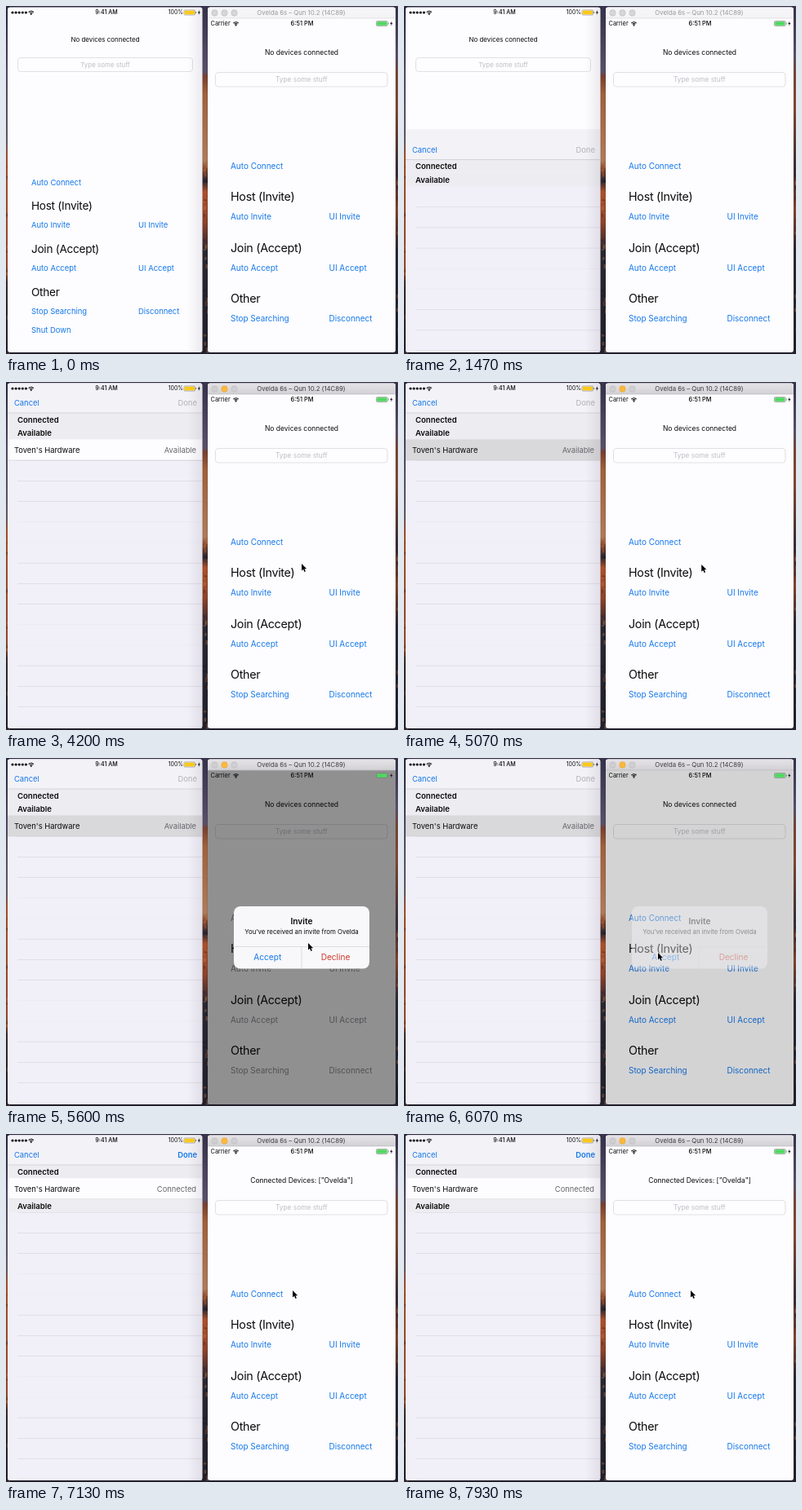
These frames come from a looping animation (480x427 px, 8 s). An HTML page with a canvas:

```html
<!DOCTYPE html>
<html lang="en">
<head>
<meta charset="utf-8">
<title>Device pairing</title>
<style>
  html, body { margin: 0; width: 100%; height: 100%; overflow: hidden; background: #23212e; }
  canvas { display: block; width: 480px; height: 427px; }
</style>
</head>
<body>
<canvas id="stage"></canvas>
<script>
const W = 480, H = 427, LOOP = 8000;
const BLUE = '#1478ea', INK = '#0b0b0c';
const PEER = "Toven's Hardware", PHONE = 'Ovelda';
const canvas = document.getElementById('stage');
const ctx = canvas.getContext('2d');
const dpr = window.devicePixelRatio || 1;
canvas.width = W * dpr;
canvas.height = H * dpr;

const clamp = v => Math.max(0, Math.min(1, v));
const span = (t, start, length) => clamp((t - start) / length);
const easeOut = p => 1 - (1 - p) ** 3;
const smooth = p => p * p * (3 - 2 * p);

function rect(x, y, w, h, color) {
  ctx.fillStyle = color;
  ctx.fillRect(x, y, w, h);
}

function roundPath(x, y, w, h, r) {
  ctx.beginPath();
  ctx.roundRect(x, y, w, h, r);
}

function dot(x, y, r, color) {
  ctx.fillStyle = color;
  ctx.beginPath();
  ctx.arc(x, y, r, 0, Math.PI * 2);
  ctx.fill();
}

function vertical(y0, y1, marks) {
  const g = ctx.createLinearGradient(0, y0, 0, y1);
  marks.forEach(([y, color]) => g.addColorStop((y - y0) / (y1 - y0), color));
  return g;
}

// y is about the middle of the capital letters
function text(str, x, y, size, { color = INK, align = 'left', weight = 400, track = 0 } = {}) {
  ctx.font = `${weight} ${size}px Inter, "Liberation Sans", sans-serif`;
  ctx.letterSpacing = `${track * size}px`;
  ctx.textAlign = align;
  ctx.textBaseline = 'alphabetic';
  ctx.fillStyle = color;
  ctx.fillText(str, x, y + size * 0.34);
}

function withAlpha(alpha, draw) {
  ctx.save();
  ctx.globalAlpha *= alpha;
  draw();
  ctx.restore();
}

// Desktop showing in the strips beside the two windows
function makeDesktop() {
  const strips = [
    [0, vertical(0, H, [[0, '#2a2a42'], [80, '#54506a'], [165, '#6b6070'], [185, '#b4562e'],
      [320, '#a54a2c'], [345, '#3a2b32'], [H, '#23222e']])],
    [240, vertical(0, H, [[0, '#38344e'], [80, '#5d5470'], [87, '#7e4432'], [108, '#a9663f'],
      [190, '#b98260'], [200, '#8d4a2f'], [215, '#2b2832'], [228, '#b5552f'],
      [265, '#96472e'], [300, '#2c2934'], [H, '#22222e']])],
    [476, vertical(0, H, [[0, '#38344e'], [60, '#5d5470'], [85, '#7e4a38'], [125, '#8a4c34'],
      [200, '#3c3038'], [250, '#8a4830'], [300, '#2c2934'], [H, '#22222e']])]
  ];
  let seed = 7;
  const rnd = () => (seed = (seed * 16807) % 2147483647) / 2147483647;
  const specks = Array.from({ length: 110 }, () => {
    const x = [0, 241, 478][Math.floor(rnd() * 3)] + rnd() * 5;
    const y = 190 + rnd() * 237;
    return [x, y, 1 + rnd() * 3, 1 + rnd() * 5, rnd() < 0.55 ? '#1a1a2666' : '#d9825055'];
  });
  return () => {
    rect(0, 0, W, 200, '#34314a');
    rect(0, 200, W, 227, '#23222e');
    strips.forEach(([x, fill]) => rect(x, 0, 9, H, fill));
    specks.forEach(s => rect(...s));
  };
}
const drawDesktop = makeDesktop();

function windowShadow(x, y, w, h) {
  ctx.save();
  ctx.shadowColor = 'rgba(0,0,0,.3)';
  ctx.shadowBlur = 4 * dpr;
  ctx.fillStyle = '#fdfcfe';
  roundPath(x, y, w, h, 3);
  ctx.fill();
  ctx.restore();
}

function wifi(x, y) {
  ctx.strokeStyle = INK;
  ctx.lineWidth = 1.1;
  [2.3, 4.2].forEach(r => {
    ctx.beginPath();
    ctx.arc(x, y, r, -Math.PI * 0.77, -Math.PI * 0.23);
    ctx.stroke();
  });
  dot(x, y - 0.3, 0.9, INK);
}

function battery(x, y, color) {
  ctx.strokeStyle = '#77777a';
  ctx.lineWidth = 0.6;
  roundPath(x, y - 3, 13.6, 6, 1.2);
  ctx.stroke();
  rect(x + 0.7, y - 2.3, 12.2, 4.6, color);
  rect(x + 14.2, y - 1, 0.9, 2, '#77777a');
  ctx.fillStyle = INK;
  ctx.beginPath();
  [[18.9, -3], [16.8, 0.5], [18.3, 0.5], [17.6, 3], [20, -0.6], [18.5, -0.6]]
    .forEach(([dx, dy]) => ctx.lineTo(x + dx, y + dy));
  ctx.fill();
}

function field(x, y, w, h, size) {
  ctx.strokeStyle = '#dddce0';
  ctx.lineWidth = 0.9;
  roundPath(x, y, w, h, 3.5);
  ctx.stroke();
  text('Type some stuff', x + w / 2, y + h / 2, size, { color: '#bfbfc5', align: 'center' });
}

// Shared page of headings and link buttons
function menu(cols, rows, linkSize, headSize, color, faded = {}) {
  const link = (str, x, y) =>
    withAlpha(faded[str] ?? 1, () => text(str, x, y, linkSize, { color }));
  const head = (str, y) => text(str, cols[0], y, headSize, { track: -0.02 });
  const [a, b] = cols;
  link('Auto Connect', a, rows[0]);
  head('Host (Invite)', rows[1]);
  link('Auto Invite', a, rows[2]);
  link('UI Invite', b, rows[2]);
  head('Join (Accept)', rows[3]);
  link('Auto Accept', a, rows[4]);
  link('UI Accept', b, rows[4]);
  head('Other', rows[5]);
  link('Stop Searching', a, rows[6]);
  link('Disconnect', b, rows[6]);
  if (rows[7]) link('Shut Down', a, rows[7]);
}

// Opacity of a button pressed at one time and released at another
function press(t, down, up) {
  return t < down ? 1 : t < up ? 0.3 : 0.3 + 0.7 * span(t, up, 230);
}

function header(str, y) {
  rect(2, y, 238, 16.2, '#ededf1');
  text(str, 14, y + 8.7, 9.55, { weight: 600 });
}

function peerRow(y, state, selected) {
  rect(2, y, 238, 25.5, selected ? '#d9d8da' : '#fdfcfe');
  rect(2, y + 25.3, 238, 0.7, '#d2d1d6');
  text(PEER, 10, y + 13.2, 9.4);
  text(state, 233, y + 13.2, 9.3, { color: '#68686c', align: 'right' });
}

function browser(t, top) {
  const joined = t >= 7130, found = t >= 3070;
  ctx.save();
  ctx.translate(0, top);
  rect(2, 1, 238, 426, '#f1eff7');
  rect(2, 1, 238, 37, '#f3f2f6');
  text('Cancel', 10, 26.2, 9.4, { color: BLUE });
  text('Done', 234, 26.2, 9.4, { color: joined ? BLUE : '#bcbbc1', align: 'right', weight: joined ? 600 : 500 });
  for (let i = 1; i < 15; i++) {
    const faint = [4, 5, 9, 10].includes(i);
    rect(14, 70.6 + i * 25.2, 226, 0.8, faint ? '#ebe9f1' : '#dddbe3');
  }
  header('Connected', 38);
  if (joined) {
    peerRow(54.2, 'Connected', false);
    header('Available', 79.8);
  } else {
    header('Available', 54.2);
    if (found) peerRow(70.4, 'Available', t >= 4930);
  }
  rect(2, 37.6, 238, 0.7, '#c9c8cd');
  ctx.restore();
}

function leftPhone(t) {
  windowShadow(2, 1.5, 238.5, 423.5);
  ctx.save();
  roundPath(2, 1.5, 238.5, 423.5, 3);
  ctx.clip();
  text('No devices connected', 121.5, 41.5, 7.95, { align: 'center' });
  field(14.5, 63.5, 214, 17, 7.95);
  menu([31, 162], [216.5, 245.5, 269, 298.5, 322, 351.5, 375, 398], 9.45, 13.6, BLUE,
    { 'UI Invite': press(t, 1170, 1290) });
  const rise = easeOut(span(t, 1325, 500));
  if (rise > 0) browser(t, 424 * (1 - rise));
  const shade = ctx.createLinearGradient(222, 0, 240.5, 0);
  shade.addColorStop(0, 'rgba(60,50,80,0)');
  shade.addColorStop(1, 'rgba(60,50,80,.09)');
  rect(222, 0, 19, H, shade);
  for (let i = 0; i < 5; i++) dot(8 + i * 4.1, 8, 1.6, INK);
  wifi(30.8, 10.5);
  text('9:41 AM', 123, 8, 7.1, { align: 'center', weight: 500 });
  text('100%', 217, 8, 6.9, { align: 'right' });
  battery(218, 8, '#fbc917');
  ctx.restore();
}

function alertBox(alpha, scale) {
  withAlpha(alpha, () => {
    ctx.translate(362, 220.5);
    ctx.scale(scale, scale);
    ctx.translate(-362, -220.5);
    ctx.fillStyle = '#f8f7f9';
    roundPath(279, 182, 166, 76.5, 8);
    ctx.fill();
    rect(279, 231, 166, 0.7, '#d3d2d5');
    rect(361.6, 231, 0.7, 27.5, '#d3d2d5');
    text('Invite', 362, 200.5, 10.2, { align: 'center', weight: 600 });
    text(`You've received an invite from ${PHONE}`, 362, 213.8, 7.8, { align: 'center' });
    text('Accept', 320.3, 245, 10.1, { align: 'center', color: BLUE });
    text('Decline', 403.5, 245, 10.1, { align: 'center', color: '#d03a2a' });
  });
}

function simulator(t) {
  const active = t >= 2200;
  windowShadow(247, 1.5, 230, 423.5);
  ctx.save();
  roundPath(247, 1.5, 230, 423.5, 3);
  ctx.clip();

  const opening = span(t, 5200, 350), closing = span(t, 5930, 370);
  const shown = smooth(opening) * (1 - closing) ** 2;
  const modal = opening > 0 && closing === 0;
  const label = t >= 7130 ? `Connected Devices: ["${PHONE}"]` : 'No devices connected';
  text(label, 362, 57.5, 8.5, { align: 'center' });
  field(256.5, 81.5, 210.5, 17.5, 8.35);
  menu([275, 395.5], [196.3, 234, 259, 296.7, 321.5, 359.2, 384], 9.95, 14.3,
    modal ? '#8b8b90' : BLUE, { 'UI Accept': press(t, 2260, 2360) });

  if (shown > 0) {
    rect(247, 15, 230, 412, `rgba(0,0,0,${0.43 * shown})`);
    alertBox(shown, 1 + 0.18 * (1 - easeOut(opening)));
  }
  text('Carrier', 250.5, 21.5, 7.4);
  wifi(281.5, 24);
  text('6:51 PM', 362.5, 21.5, 7.4, { align: 'center', weight: 500 });
  battery(453.5, 21.5, '#4cd95f');

  const bar = active ? ['#e6e4e7', '#d2d0d4'] : ['#f6f5f7', '#f4f3f5'];
  rect(247, 1, 230, 14, vertical(1, 15, [[1, bar[0]], [15, bar[1]]]));
  rect(247, 14.6, 230, 0.7, active ? '#b9b8bb' : '#d8d7da');
  [255.5, 267.5, 279.5].forEach((x, i) => {
    const lit = active && i === 1;
    dot(x, 8.5, 3.9, lit ? '#e9a433' : '#bebdc0');
    dot(x, 8.5, 3.3, lit ? '#fdb93e' : active ? '#cfced1' : '#d6d5d8');
  });
  text(`${PHONE} 6s – Qun 10.2 (14C89)`, 361.5, 8.5, 7.75,
    { align: 'center', color: active ? '#3b3a3d' : '#98979a' });
  ctx.restore();
}

// Pointer stops: time, x, y
const stops = [
  [1800, 482, 428], [2200, 428, 325], [2600, 428, 325], [3600, 362, 223],
  [4870, 362, 223], [5450, 370, 227], [5620, 370, 227], [5880, 311, 239],
  [6260, 311, 239], [7000, 351, 192], [8000, 351, 192]
];

function pointer(t) {
  if (t < stops[0][0]) return;
  const i = stops.findIndex(s => s[0] > t);
  const [t0, x0, y0] = stops[i - 1], [t1, x1, y1] = stops[i];
  const p = smooth(span(t, t0, t1 - t0));
  ctx.save();
  ctx.translate(x0 + (x1 - x0) * p, y0 + (y1 - y0) * p);
  ctx.beginPath();
  [[0, 0], [0, 8.6], [2, 6.8], [3.4, 10], [4.9, 9.3], [3.5, 6.2], [6.2, 6.2]]
    .forEach(([x, y]) => ctx.lineTo(x, y));
  ctx.closePath();
  ctx.lineWidth = 1.2;
  ctx.strokeStyle = '#fff';
  ctx.stroke();
  ctx.fillStyle = '#000';
  ctx.fill();
  ctx.restore();
}

function draw(t) {
  ctx.setTransform(dpr, 0, 0, dpr, 0, 0);
  drawDesktop();
  leftPhone(t);
  simulator(t);
  pointer(t);
}

const began = performance.now();
function tick() {
  draw((performance.now() - began) % LOOP);
  requestAnimationFrame(tick);
}
tick();
</script>
</body>
</html>
```
